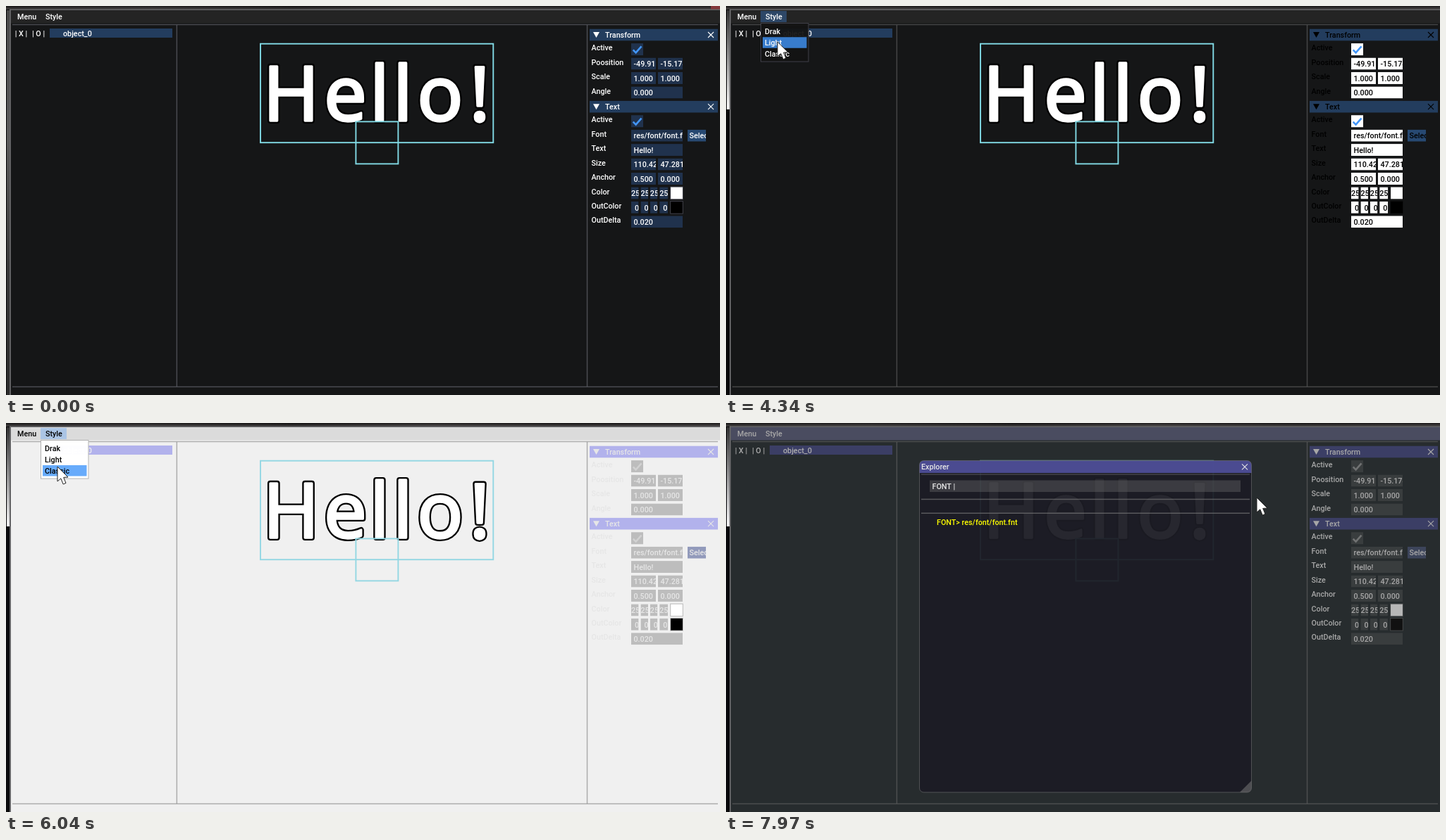
An HTML page with a canvas for the animation above (8000 ms loop, 1013x553 px).

```html
<!DOCTYPE html>
<html lang="en">
<head>
<meta charset="utf-8">
<title>Editor styles</title>
<style>
  html, body { margin: 0; width: 100%; height: 100%; overflow: hidden; background: #151617; }
  canvas { display: block; }
</style>
</head>
<body>
<canvas id="stage" width="1013" height="553"></canvas>
<script>
const LOOP = 8000;
const c = document.getElementById('stage').getContext('2d');
const UI_FONT = '500 10.75px Roboto, sans-serif';

const dark = {
  bg: 'rgb(21,22,23)', text: '#fff', menuBar: 'rgb(36,36,36)',
  header: 'rgba(66,150,250,.31)', hover: 'rgba(66,150,250,.8)',
  frame: 'rgba(41,74,122,.54)', check: 'rgb(66,150,250)',
  button: 'rgba(66,150,250,.4)', buttonHover: 'rgb(66,150,250)',
  popup: 'rgba(20,20,20,.94)', border: 'rgba(110,110,128,.5)', line: 'rgba(110,110,120,.6)'
};
const light = {
  ...dark, bg: 'rgb(240,240,240)', text: '#000', menuBar: 'rgb(219,219,219)',
  frame: '#fff', popup: 'rgba(255,255,255,.98)', border: 'rgba(0,0,0,.3)', line: 'rgba(99,99,99,.62)'
};
const classic = {
  bg: 'rgb(33,41,44)', text: 'rgb(230,230,230)', menuBar: 'rgb(88,90,121)',
  header: 'rgba(102,102,230,.45)', hover: 'rgba(115,115,230,.8)',
  frame: 'rgba(110,110,110,.39)', check: 'rgba(230,230,230,.5)',
  button: 'rgba(89,102,156,.62)', buttonHover: 'rgba(102,122,181,.79)',
  popup: 'rgba(28,28,36,.92)', border: 'rgba(128,128,128,.5)', line: 'rgba(128,128,128,.6)'
};

// time, x, y of the pointer tip
const pointerPath = [
  [100, 1013, 553], [220, 840, 540], [300, 670, 497], [380, 480, 425], [450, 385, 375],
  [520, 283, 312], [600, 183, 205], [680, 120, 130], [820, 68, 81], [880, 68, 81],
  [1140, 20, 14], [1700, 20, 14], [1920, 24, 45], [2270, 24, 45], [2540, 58, 18],
  [2690, 60, 20], [2850, 61, 21], [2960, 61, 21], [3150, 71, 39.5], [3900, 71, 39.5],
  [4170, 73, 50], [4400, 73, 51], [4600, 73, 51], [4680, 73, 38], [4800, 65, 17],
  [5130, 65, 17], [5410, 73, 62], [6510, 73, 62], [6700, 340, 100], [6870, 750, 152],
  [6960, 918, 173], [7110, 950, 180], [7350, 979, 184], [7580, 979, 184],
  [7760, 850, 138], [7970, 753, 106]
];

const menus = {
  Menu: { x: 9, w: 40, textX: 16, popupW: 96, items: ['New Project', 'Open Project', 'Save Project', 'Free Project'] },
  Style: { x: 49, w: 37, textX: 56, popupW: 68.5, items: ['Drak', 'Light', 'Classic'] }
};

function pointerAt(t) {
  if (t < pointerPath[0][0]) return { x: -50, y: -50 };
  const next = pointerPath.findIndex(k => k[0] > t);
  if (next < 0) return { x: 753, y: 106 };
  const [t0, x0, y0] = pointerPath[next - 1], [t1, x1, y1] = pointerPath[next];
  const f = (t - t0) / (t1 - t0);
  return { x: x0 + (x1 - x0) * f, y: y0 + (y1 - y0) * f };
}

const inside = (p, x, y, w, h) => p.x >= x && p.x < x + w && p.y >= y && p.y < y + h;

function box(x, y, w, h, color) {
  c.fillStyle = color;
  c.fillRect(x, y, w, h);
}

function outline(x, y, w, h, color, width = 1) {
  c.strokeStyle = color;
  c.lineWidth = width;
  c.strokeRect(x, y, w, h);
}

function label(text, x, middle, color) {
  c.font = UI_FONT;
  c.fillStyle = color;
  c.fillText(text, x, middle + 3.9);
}

function poly(points, close) {
  c.beginPath();
  points.forEach(([x, y]) => c.lineTo(x, y));
  if (close) c.closePath();
}

function cross(x, y, color) {
  c.strokeStyle = color;
  c.lineWidth = 1.1;
  for (const d of [-4, 4]) {
    poly([[x - d, y - 4], [x + d, y + 4]]);
    c.stroke();
  }
}

function field(text, x, y, w, color, theme, pad = 3.5) {
  c.save();
  c.beginPath();
  c.rect(x, y - 8.5, w, 17);
  c.clip();
  box(x, y - 8.5, w, 17, color);
  label(text, x + pad, y + .3, theme.text);
  c.restore();
}

function gradient(x, y, w, h, vertical, ...colors) {
  const g = c.createLinearGradient(x, y, vertical ? x : x + w, vertical ? y + h : y);
  colors.forEach((color, i) => g.addColorStop(i / (colors.length - 1), color));
  box(x, y, w, h, g);
}

// Blurred strips of the desktop behind the window.
function desktop(t) {
  box(0, 0, 1013, 553, '#0a0a0b');
  gradient(0, 0, 1013, 5, false, '#2a2728', '#3c3839', '#1d1a1b', '#454041', '#2a2627', '#3a3536');
  gradient(0, 0, 1013, 5, true, 'rgba(8,8,8,.6)', 'rgba(90,88,88,.5)');
  if (t < 70) {
    box(1000, 0, 13, 5, '#84383b');
    gradient(1, 6, 4, 547, true, '#4a4a4a', '#5c5c5c', '#3a3a3a', '#2c2c2c');
  } else {
    gradient(1, 6, 4, 141, true, '#333', '#f4f4f4');
  }
  box(5, 4.5, 1008, 1.5, '#626264');
  box(5, 4.5, 2, 549, '#626264');
}

function scene(theme) {
  const boxColor = theme === light ? '#93d7e3' : '#82dbe6';
  const letters = [['H', 404.5], ['e', 481.5], ['l', 530], ['l', 563], ['o', 616], ['!', 672]];
  c.font = '108px "Noto Sans", "Open Sans", sans-serif';
  c.textAlign = 'center';
  c.lineJoin = 'round';
  for (const [color, width] of [['#000', 8], ['#fff', 3.3]]) {
    c.strokeStyle = c.fillStyle = color;
    c.lineWidth = width;
    for (const [ch, x] of letters) {
      c.strokeText(ch, x, 163.2);
      c.fillText(ch, x, 163.2);
    }
  }
  c.textAlign = 'left';
  c.lineJoin = 'miter';
  outline(361, 53.7, 330.3, 140.5, boxColor, 1.9);
  outline(496.4, 164.4, 60, 60, boxColor, 1.9);
}

function objectList(theme, hovered) {
  box(62, 32, 174, 13, hovered ? theme.hover : theme.header);
  const color = theme === classic ? '#f0f0f0' : '#fff';
  [['|', 12.7], ['X', 18], ['|', 27.5], ['|', 37], ['O', 42.3], ['|', 52.5]].forEach(([s, x]) => label(s, x, 39, color));
  label('object_0', 81, 39, color);
}

function sectionHeader(title, y, theme) {
  box(828, y - 8.3, 182, 16.6, theme.header);
  poly([[833, y - 4], [842, y - 4], [837.5, y + 4]], true);
  c.fillStyle = theme.text;
  c.fill();
  label(title, 850, y + .3, theme.text);
  cross(1000, y, theme.text);
}

function inspector(theme, pointer) {
  const rowY = i => 61.6 + 20.43 * i;
  const name = (text, i) => label(text, 830.5, rowY(i) - 2.2, theme.text);
  const values = (i, ...list) => {
    const w = list.length === 1 ? 73 : 35;
    list.forEach((v, k) => field(v, 887 + 38 * k, rowY(i), w, theme.frame, theme));
  };
  const checkbox = i => {
    const y = rowY(i);
    name('Active', i);
    box(887, y - 8.5, 17, 17, theme.frame);
    poly([[889.7, y + .8], [893.6, y + 4.8], [901.5, y - 4.2]]);
    c.strokeStyle = theme.check;
    c.lineWidth = 2.6;
    c.stroke();
  };
  const colorRow = (title, i, value, pad, swatch) => {
    const y = rowY(i);
    name(title, i);
    for (let k = 0; k < 4; k++) field(value, 887 + 13.4 * k, y, k < 3 ? 10.6 : 12, theme.frame, theme, pad);
    box(943, y - 8.5, 17, 17, swatch);
    outline(942.7, y - 8.8, 17.6, 17.6, theme.border);
  };

  sectionHeader('Transform', 41, theme);
  checkbox(0);
  name('Poosition', 1); values(1, '-49.91', '-15.174');
  name('Scale', 2); values(2, '1.000', '1.000');
  name('Angle', 3); values(3, '0.000');
  sectionHeader('Text', 143.2, theme);
  checkbox(5);
  name('Font', 6); values(6, 'res/font/font.fnt');
  const overSelect = inside(pointer, 967, 175, 26, 18);
  field('Select', 967, rowY(6), 26, overSelect ? theme.buttonHover : theme.button, theme, 2.5);
  name('Text', 7); values(7, 'Hello!');
  name('Size', 8); values(8, '110.42', '47.281');
  name('Anchor', 9); values(9, '0.500', '0.000');
  colorRow('Color', 10, '255', 0, '#fff');
  colorRow('OutColor', 11, '0', 5, '#000');
  name('OutDelta', 12); values(12, '0.020');
}

function menuBar(theme, open, pointer, active) {
  box(7, 6, 1006, 18.5, theme.menuBar);
  for (const [title, m] of Object.entries(menus)) {
    const hovered = active && inside(pointer, m.x, 7, m.w, 17);
    if (hovered || open === title) box(m.x, 7, m.w, 16, hovered ? theme.hover : theme.header);
    label(title, m.textX, 15.3, theme.text);
  }
}

function popupMenu(theme, m, pointer) {
  const h = 8 + 15.85 * m.items.length;
  box(m.x, 24, m.popupW, h, theme.popup);
  outline(m.x + .5, 24.5, m.popupW - 1, h - 1, theme.border);
  m.items.forEach((item, i) => {
    const y = 28.5 + 15.75 * i;
    if (inside(pointer, m.x, y, m.popupW, 15.75)) box(m.x + 3, y, m.popupW - 6, 15.5, theme.hover);
    label(item, m.x + 6, y + 8, theme.text);
  });
}

function explorer(theme) {
  const panel = new Path2D();
  panel.roundRect(274.5, 53.5, 471, 471.5, 6);
  c.fillStyle = theme.popup;
  c.fill(panel);
  c.save();
  c.clip(panel);
  box(274, 53, 472, 18, 'rgba(82,82,161,.87)');
  poly([[729, 525], [746, 508], [746, 525]], true);
  c.fillStyle = 'rgb(78,78,82)';
  c.fill();
  c.restore();
  c.strokeStyle = theme.border;
  c.lineWidth = 1;
  c.stroke(panel);
  label('Explorer', 277, 62.5, theme.text);
  cross(736, 62.3, theme.text);
  box(277, 72.5, 466, 1, theme.line);
  box(289, 81.5, 441, 16.5, theme.frame);
  label('FONT |', 292.5, 90, theme.text);
  for (const y of [107.7, 127.5]) box(277, y, 466, 1.5, theme.line);
  label('FONT> res/font/font.fnt', 299, 141.3, '#ff0');
}

function drawPointer({ x, y }) {
  const shape = [[0, 0], [0, 21], [4.8, 16.8], [8.2, 25], [12, 23.4], [8.7, 15.4], [15, 15]];
  poly(shape.map(([dx, dy]) => [x + dx, y + dy]), true);
  c.fillStyle = '#fff';
  c.strokeStyle = '#222';
  c.lineWidth = 1;
  c.fill();
  c.stroke();
}

function draw(t) {
  const pointer = pointerAt(t);
  // The contents take a new style one step before the window and its menus.
  const content = t < 4335 ? dark : t < 6030 ? light : classic;
  const chrome = t < 4400 ? dark : t < 6095 ? light : classic;
  const modal = t >= 7500;
  const open = t >= 1375 && t < 2500 ? 'Menu'
    : (t >= 2500 && t < 4400) || (t >= 4945 && t < 6095) ? 'Style' : '';

  desktop(t);
  box(7, 6, 1006, 547, chrome.bg);
  menuBar(chrome, open, pointer, !modal);
  box(9, 25.8, 1001, 1.4, content.line);
  box(9, 540.6, 1001, 1.5, content.line);
  for (const x of [241.6, 823.8]) box(x, 27, 1.5, 514, content.line);
  scene(chrome);
  objectList(content, !open && !modal && inside(pointer, 62, 32, 174, 13));
  inspector(content, modal ? { x: -50, y: -50 } : pointer);
  if (open) popupMenu(chrome, menus[open], pointer);
  if (modal) {
    const dim = .35 * Math.min(1, (t - 7470) / 170);
    box(7, 6, 1006, 547, `rgba(51,51,51,${dim})`);
    explorer(classic);
  }
  drawPointer(pointer);
}

const start = performance.now();
function tick() {
  draw((performance.now() - start) % LOOP);
  requestAnimationFrame(tick);
}
tick();
</script>
</body>
</html>
```
